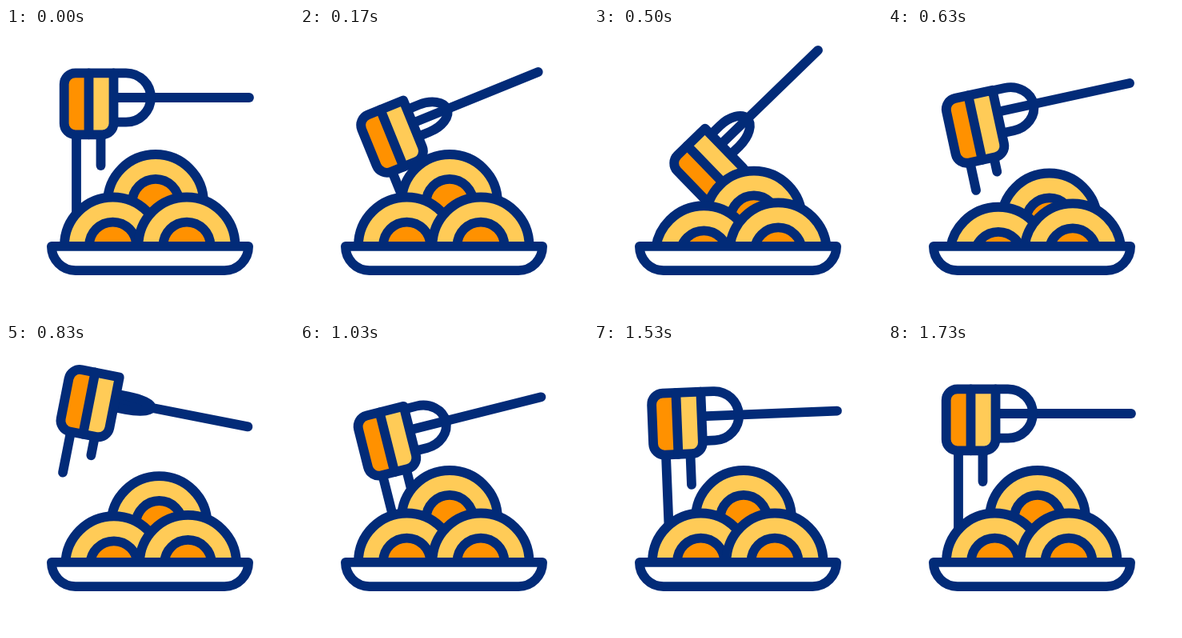
Animation of 360x360 px, one loop 2 s. Source, as an HTML page with a canvas:

```html
<!DOCTYPE html>
<html>
<head>
<meta charset="utf-8">
<title>Noodles</title>
<style>
html, body { margin: 0; width: 100%; height: 100%; overflow: hidden; background: #fff; }
canvas { display: block; width: 360px; height: 360px; }
</style>
</head>
<body>
<canvas id="stage"></canvas>
<script>
const NAVY = '#022b78', YELLOW = '#ffcb57', ORANGE = '#ff9100';
const LOOP = 2000, FPS = 30;
const PIVOT_X = 219, AXIS = 87, FLOOR = 272.9;

const canvas = document.getElementById('stage');
const ctx = canvas.getContext('2d');
const dpr = window.devicePixelRatio || 1;
canvas.width = canvas.height = 360 * dpr;

// Smooth rise from 0 to 1 between two times.
function ease(t, from, to) {
  const p = Math.min(1, Math.max(0, (t - from) / (to - from)));
  return (1 - Math.cos(Math.PI * p)) / 2;
}

// Smooth rise to 1 at the peak, then back to 0.
function bump(t, from, peak, to) {
  return ease(t, from, peak) - ease(t, peak, to);
}

function poseAt(t) {
  return {
    // plunge, scoop up past level, dip again, settle
    angle: -56 * ease(t, 0, 385) + 67.8 * ease(t, 385, 803)
      - 32.4 * ease(t, 803, 1130) + 20.6 * ease(t, 1130, 1645),
    // 1 shows the fork flat, 0 shows it edge-on
    twist: 1 - 0.92 * bump(t, 0, 360, 610) - 0.73 * bump(t, 610, 850, 1100),
    sink: bump(t, 190, 600, 970),
    longEnd: 145 - 55 * ease(t, 250, 480) + 55 * ease(t, 600, 1400),
    shortEnd: 85 - 12 * ease(t, 250, 480) + 12 * ease(t, 830, 1230)
  };
}

function line(x1, y1, x2, y2) {
  ctx.beginPath();
  ctx.moveTo(x1, y1);
  ctx.lineTo(x2, y2);
  ctx.stroke();
}

function disc(x, y, r, fill) {
  ctx.beginPath();
  ctx.arc(x, y, r, 0, 2 * Math.PI);
  ctx.fillStyle = fill;
  ctx.fill();
  ctx.stroke();
}

function mound(x, y, r) {
  disc(x, y, r, YELLOW);
  disc(x, y, r / 2 - 0.8, ORANGE);
}

function forkHead(h) {
  ctx.beginPath();
  ctx.moveTo(134.5, AXIS - h);
  ctx.lineTo(150, AXIS - h);
  ctx.ellipse(150, AXIS, 31, h, 0, -Math.PI / 2, Math.PI / 2);
  ctx.lineTo(134.5, AXIS + h);
  if (h < 11) {
    ctx.fillStyle = NAVY;
    ctx.fill();
  }
  ctx.stroke();
}

// Noodles wrapped round the fork: only the corner by the handle is square.
function bundle(top, height) {
  const left = 72.7, mid = 103.5, right = 134.5;
  ctx.save();
  ctx.beginPath();
  ctx.roundRect(left, top, right - left, height, [14, 0, 14, 14]);
  ctx.save();
  ctx.clip();
  ctx.fillStyle = ORANGE;
  ctx.fillRect(left, top, mid - left, height);
  ctx.fillStyle = YELLOW;
  ctx.fillRect(mid, top, right - mid, height);
  ctx.restore();
  ctx.stroke();
  line(mid, top, mid, top + height);
  ctx.restore();
}

function fork({ angle, twist, sink, longEnd, shortEnd }) {
  const half = 30.7 - 3 * sink;
  ctx.save();
  ctx.translate(PIVOT_X, AXIS);
  ctx.rotate(angle * Math.PI / 180);
  ctx.translate(-PIVOT_X, -AXIS);
  line(134.5, AXIS, 304, AXIS);
  forkHead(half * twist);
  line(88, 130, 88, AXIS + longEnd);
  line(118.5, 130, 118.5, AXIS + shortEnd);
  bundle(AXIS - half, 77 + 5.5 * sink);
  ctx.restore();
}

function mounds(u) {
  ctx.save();
  ctx.beginPath();
  ctx.rect(0, 0, 360, FLOOR);
  ctx.clip();
  mound(187 + 15 * u, 218 + 24 * u, 60);
  mound(133.5 + 4.5 * u, 272 + 12.5 * u, 60.5);
  mound(226 + 5 * u, 272 + 8 * u, 60.5);
  ctx.restore();
}

function plate() {
  const left = 56.9, right = 303.1, bottom = 303.1, r = 30;
  ctx.beginPath();
  ctx.moveTo(left, FLOOR);
  ctx.lineTo(right, FLOOR);
  ctx.arcTo(right, bottom, right - r, bottom, r);
  ctx.arcTo(left, bottom, left, FLOOR, r);
  ctx.closePath();
  ctx.fillStyle = '#fff';
  ctx.fill();
  ctx.stroke();
}

function draw(now) {
  const step = Math.floor((now % LOOP) * FPS / 1000 + 0.11);
  const pose = poseAt(step * 1000 / FPS);

  ctx.setTransform(dpr, 0, 0, dpr, 0, 0);
  ctx.fillStyle = '#fff';
  ctx.fillRect(0, 0, 360, 360);
  ctx.strokeStyle = NAVY;
  ctx.lineWidth = 11.8;
  ctx.lineCap = ctx.lineJoin = 'round';
  fork(pose);
  mounds(pose.sink);
  plate();
}

let start = null;
function tick(now) {
  if (start === null) start = now;
  draw(now - start);
  requestAnimationFrame(tick);
}
draw(0);
requestAnimationFrame(tick);
</script>
</body>
</html>
```
